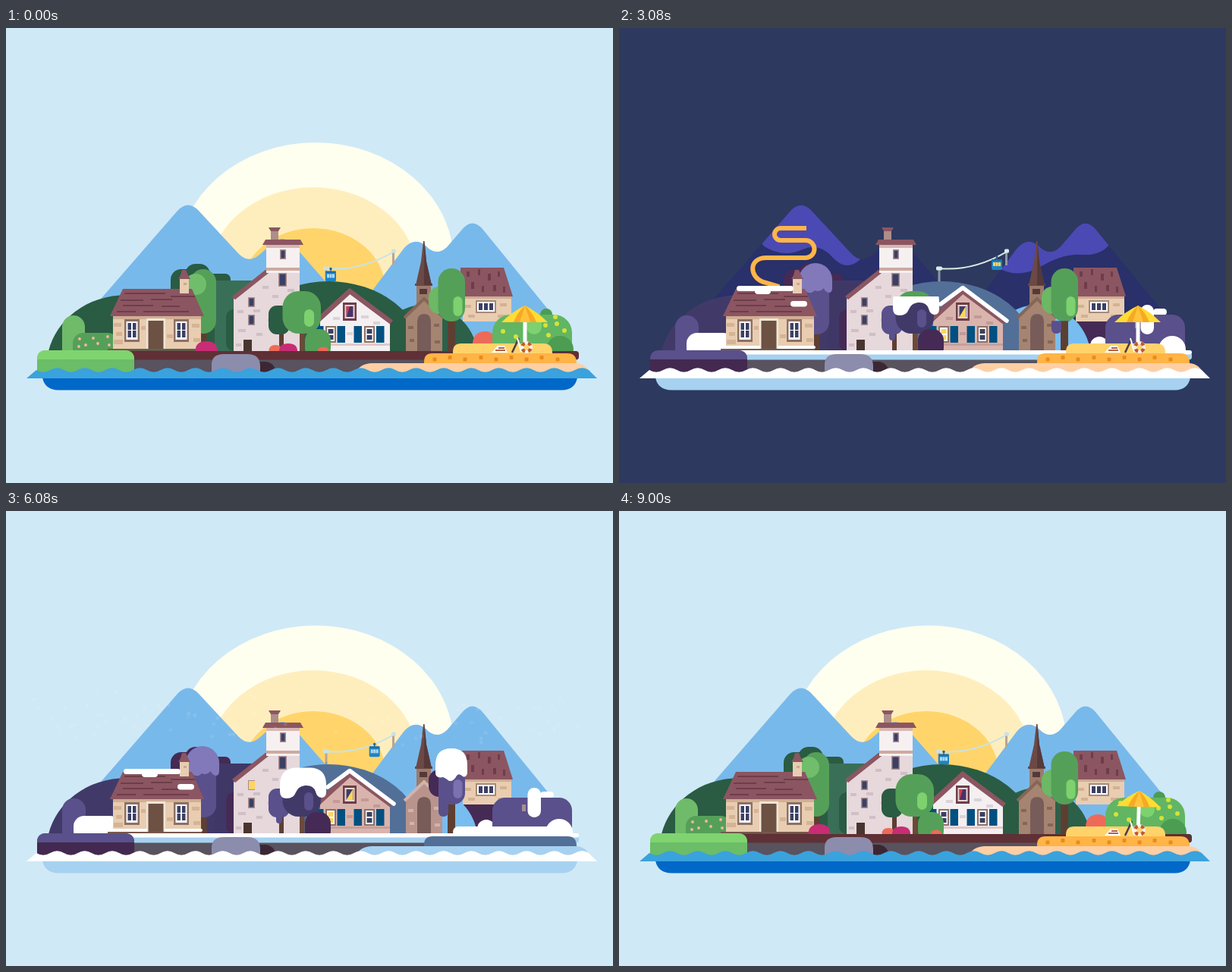
An HTML page that plays this animation: 800 by 600 pixels, repeating every 9960 ms.

```html
<!DOCTYPE html>
<html lang="en">
<head>
<meta charset="utf-8">
<title>Summer and winter village</title>
<style>
html, body { margin: 0; width: 100%; height: 100%; overflow: hidden; background: #d0e9f6; }
svg { display: block; width: 100vw; height: 100vh; }
</style>
</head>
<body>
<svg id="stage" viewBox="0 0 800 600"></svg>
<script>
const LOOP = 9960, REST = 9000;

// Shape helpers
const R = (x, y, w, h, fill, r = 0) => `<rect x="${x}" y="${y}" width="${w}" height="${h}" rx="${r}" fill="${fill}"/>`;
const P = (d, fill) => `<path d="${d}" fill="${fill}"/>`;
const L = (d, color, width, more = '') => `<path d="${d}" fill="none" stroke="${color}" stroke-width="${width}" ${more}/>`;
const E = (x, y, rx, ry, fill) => `<ellipse cx="${x}" cy="${y}" rx="${rx}" ry="${ry}" fill="${fill}"/>`;
const C = (x, y, r, fill) => E(x, y, r, r, fill);
const G = (id, body) => `<g id="${id}">${body}</g>`;
const dots = (list, r, fill) => list.map(([x, y]) => C(x, y, r, fill)).join('');
const bars = (list, fill) => list.map(([x, y, w, h = 2]) => R(x, y, w, h, fill)).join('');

// Timing: [winter starts, winter full, summer starts, summer full]
const clamp = v => Math.max(0, Math.min(1, v));
const ease = v => (v = clamp(v), v < .5 ? 2 * v * v : 1 - 2 * (1 - v) ** 2);
const wave = v => (1 - Math.cos(Math.PI * clamp(v))) / 2;
const winter = (t, [a, b, c, d]) => ease((t - a) / (b - a)) - ease((t - c) / (d - c));

// A season change that climbs from y1 up to y0
const swaps = [];
function swap(span, y0, y1, summer, snowy) {
  const n = swaps.push({ span, y0, y1 }) - 1;
  return `<clipPath id="s${n}"><rect width="800" height="600"/></clipPath>
    <clipPath id="w${n}"><rect width="800" height="600"/></clipPath>
    <g clip-path="url(#s${n})">${summer}</g><g clip-path="url(#w${n})">${snowy}</g>`;
}

// A piece that shrinks to its foot in winter
const pops = [];
function pop(span, x, y, body, tilt = 0) {
  const n = pops.push({ span, x, y, tilt }) - 1;
  return G('p' + n, body);
}

const ROOF = '#8b5661', ROOF_DK = '#6e3d49', WALL = '#e8cdb1', PANE = '#3b4064', FOREST = '#2a5b43',
  LEAF = '#55a058', LIME = '#7dd16f', PLUM = '#452a55', VIOLET = '#5a508b', DUSK = '#413a69',
  ICE = '#a6d1f0', STEEL = '#526f98', SNOW = '#fff', GOLD = '#ffd55e', TRUNK = '#5d3f32',
  CORAL = '#ee6a58', PINK = '#c82c74';

const sky = () => R(0, 0, 800, 600, '#d0e9f6') + G('night', C(400, 300, 1, '#2d395f'));

// Everything behind the shore ends at the waterline
function backdrop() {
  return `<clipPath id="land"><rect width="800" height="440"/></clipPath><g clip-path="url(#land)">${sun() + mountains() + hills()}</g>`;
}

function sun() {
  return G('sun0', E(0, 0, 182, 157, '#fffff0')) + G('sun1', E(0, 0, 137, 115, '#ffeebd')) + G('sun2', E(0, 0, 95, 81, '#ffd56b'));
}

function mountains() {
  const d = `M66 425L226 241Q240 226 254 241L306 297Q320 312 335 298L350 285Q364 271 378 285L500 425Z
    M424 425L524 291Q538 275 553 287Q567 302 581 289L600 267Q614 249 628 265L716 373V425Z`;
  const caps = `M150 200H330L318 305Q300 322 282 303Q264 282 242 292Q215 304 190 287Z
    M490 200H660L645 287Q634 300 612 299Q585 296 552 317Q522 331 498 315Z`;
  return `<clipPath id="ridge"><path d="${d}"/></clipPath>` + G('slopes', P(d, '#78b9eb'))
    + `<g clip-path="url(#ridge)"><g id="peaks">${P(d, '#29306a')}<g clip-path="url(#ridge)">${G('caps', P(caps, '#4b49b3'))}</g></g></g>`;
}

function hills() {
  const left = 'M56 426C66 386 105 352 160 352H300V426Z';
  const wood = (a, b) => R(217, 318, 55, 60, a, 14) + R(236, 311, 33, 40, a, 14) + R(262, 324, 34, 36, a, 7)
    + R(275, 333, 75, 93, b) + R(290, 371, 40, 55, a, 10);
  const pole = c => R(420.5, 316, 3, 19, c) + R(509, 294, 3, 19, c);
  const rope = c => L('M422 317Q466.5 321 511 295', c, 2) + R(418, 314.5, 8, 5, c, 1.5) + R(508, 291.5, 6, 5, c, 1.5);
  return swap([2000, 2700, 6200, 6900], 350, 426, P(left, FOREST), P(left, DUSK))
    + swap([2050, 2750, 6250, 6950], 309, 426, wood(FOREST, '#3a6f57'), wood(PLUM, '#3f3866'))
    + swap([2300, 2800, 5700, 6200], 290, 336, pole('#b7a596') + rope('#c9e3e6'), pole('#8d97a9') + rope('#dcebe4'))
    + G('car', L('M0 0V4', '#2b5f8f', 1.5) + C(0, 0, 1.7, '#2b5f8f') + R(-7, 4, 14, 13, '#1f83c4', 2) + R(-7, 3, 14, 2.5, '#1c6dad', 1)
      + G('panes', [-5, -1.5, 2].map(x => R(x, 7, 3, 5, 'inherit')).join('')))
    + swap([2200, 2900, 6200, 6900], 363, 426, E(552, 436, 70, 71, '#2c6049'),
      R(600, 383, 90, 44, PLUM, 12) + E(552, 436, 70, 71, '#78bdf0'))
    + swap([1950, 2650, 6100, 6750], 332, 426, E(425, 434, 125, 100, FOREST), E(425, 434, 125, 100, STEEL));
}

function window2(x) {
  return R(x, 384, 20, 30, '#8d7065') + R(x + 2.5, 387, 15, 24, '#fff')
    + [[4.5, 389], [11, 389], [4.5, 399], [11, 399]].map(([a, y]) => R(x + a, y, 4.5, 9, PANE)).join('');
}

function cottage() {
  const tree = R(257, 385, 7.5, 41, TRUNK);
  const summerTree = R(243, 318, 34, 85, LEAF, 17) + C(250, 338, 14, '#70bd6c');
  const snowyTree = R(243, 325, 34, 79, VIOLET, 16)
    + P('M237 332A22 22 0 0 1 281 332V343Q281 349 276 349Q271 347 270 343Q264 349 258 346Q252 352 246 347Q237 347 237 340Z', '#8279ba');
  const flowers = dots([[97, 410], [105, 418], [115, 409], [121, 416], [134, 407], [136, 418], [96, 420]], 1.9, '#f6b6a6');
  const roof = bars([[156, 349, 54], [217, 353, 32], [151, 358, 30], [191, 357, 28], [154, 365, 40], [205, 366, 24], [146, 373, 25], [181, 373, 60]], ROOF_DK);
  return tree + swap([2100, 2700, 6250, 6950], 309, 426, summerTree, snowyTree)
    + swap([2100, 2700, 6900, 7500], 377, 426, R(74, 379, 30, 60, '#6fbb69', 15), R(74, 379, 31, 60, VIOLET, 15))
    + swap([2200, 2800, 7250, 7750], 401, 426, R(88, 402, 60, 34, LEAF, 14) + flowers, R(89, 402, 62, 34, SNOW, 14))
    + L('M247 264H213A8 8 0 0 0 213 280H246A11.5 11.5 0 0 1 246 303H194C171 303 171 328 190 335L214 342', '#ffb549', 6, 'id="smoke"')
    + R(141, 378, 116, 47, WALL) + R(141, 379, 116, 5, '#d1ae94')
    + bars([[142, 389, 10, 5], [145, 401, 8, 5], [142, 411, 12, 6], [178, 393, 6, 5], [212, 404, 8, 5], [245, 390, 10, 5], [247, 409, 9, 5]], '#d4b493')
    + P('M154 344H245L261 380H137Z', ROOF) + roof
    + R(229, 330, 12, 20, WALL) + P('M227 331L230 326L232 319H237L240 326L243 331Z', ROOF) + R(234, 336, 4, 3, '#c9a98f')
    + window2(156) + window2(221) + R(185, 383, 25, 42, '#f0e6d8') + R(187.5, 386, 20, 39, '#6d5143')
    + R(134, 423, 124, 2.5, '#77594c')
    + swap([2250, 2850, 7350, 7800], 338, 367, '', R(155, 340, 75, 7, SNOW, 3.5) + R(179, 343, 21, 8, SNOW, 4))
    + swap([2300, 2850, 6800, 7200], 358, 424, '', R(226, 360, 22, 7.5, SNOW, 3.7) + R(209, 419, 50, 4, SNOW, 2) + R(141, 419, 45, 4, SNOW));
}

function tower() {
  const pane = (x, y, w, h) => R(x, y, w, h, '#a98c90') + R(x + 1.5, y + 1.5, w - 3, h - 3, PANE);
  return P('M300 426V357L343 322H387V426Z', '#e6d8db')
    + bars([[338, 340, 8, 4], [351, 352, 8, 4], [371, 344, 9, 4], [305, 372, 8, 4], [326, 371, 9, 4], [345, 383, 8, 4], [306, 397, 10, 4], [330, 402, 8, 4], [303, 416, 7, 4]], '#d0bfc6')
    + L('M300 356L344 321', ROOF, 6) + R(343, 286, 44, 37, '#f6f0f1') + R(343, 286, 44, 4, '#d7b6b1') + R(343, 316, 44, 4, '#cfa99f')
    + R(349, 266, 10, 15, '#ad8e8a') + P('M346 263H362L359 268H349Z', ROOF) + P('M342 279H388L392 286H338Z', ROOF)
    + pane(361, 292, 8, 13) + pane(359, 323, 11, 18) + pane(319, 355, 9, 13) + pane(319, 378, 9, 14) + R(313, 411, 11, 15, '#49352f')
    + swap([3300, 3700, 7000, 7480], 355, 368, '', R(320, 356, 8, 11, GOLD));
}

function chalet() {
  const wall = 'M414 426V383L453 350L506 388V426Z';
  const pane = (x, lit) => R(x, 393, 14, 22, '#8d7065') + R(x + 2, 395, 10, 18, '#fff') + R(x + 3.5, 397, 7, 6, lit) + R(x + 3.5, 405, 7, 6, lit);
  const face = c => bars([[431, 381, 9, 4], [468, 379, 10, 4], [484, 387, 9, 4], [449, 401, 8, 4]], c);
  const loft = R(444, 362, 18, 24, ROOF_DK) + R(446.5, 365, 13, 18, '#e8d6d2');
  const span = [2200, 2900, 6200, 6900];
  return swap(span, 340, 426,
    P(wall, '#f4eff1') + face('#ddd2d8') + R(414, 416, 92, 3, '#dfc9c8') + loft + R(448.5, 367, 9, 14, '#47336a') + P('M448.5 367H453L449 381Z', '#cc3d4d') + pane(421, PANE),
    P(wall, '#d9b4ad') + face('#c29a98') + R(414, 416, 92, 3, '#c69f9b') + loft + R(448.5, 367, 9, 14, PANE) + P('M448.5 381L457 367V381Z', GOLD) + pane(421, GOLD))
    + pane(472, PANE) + [408, 436.5, 458.5, 488].map(x => R(x, 393, 10.5, 22, '#005081')).join('')
    + L('M407 389L453 347L508 388', ROOF, 6.5)
    + swap(span, 338, 390, '', L('M424 364L453 342.5L511 386', SNOW, 5.5, 'stroke-linecap="round" stroke-linejoin="round"'));
}

function midTree() {
  const snowcap = 'M361 361Q361 338.5 384 338.5H400Q422 338.5 422 361V370Q422 378 416 378Q410 378 408 370Q405 361 394 362Q385 363 382 371Q379 379 370 379Q361 379 361 370Z';
  const span = [2600, 3280, 6300, 7000];
  return R(360, 395, 6, 31, TRUNK) + R(387, 398, 6.5, 28, '#6b4a39')
    + swap(span, 339, 426,
      R(346, 366, 28, 38, FOREST, 11) + R(364.5, 347, 50.5, 56, LEAF, 21) + R(393, 371, 13, 23, LIME, 6.5),
      R(346, 366, 28, 38, VIOLET, 11) + R(356, 400, 8, 12, VIOLET, 4) + R(364.5, 347, 50.5, 56, DUSK, 21) + P(snowcap, SNOW) + R(393, 371, 12, 24, VIOLET, 6))
    + swap([2300, 2900, 6300, 6900], 396, 426, R(394, 397, 34, 40, LEAF, 15), R(394, 397, 34, 40, PLUM, 15));
}

function church() {
  const nave = (c, edge) => P('M527 426V380L551 356L575 380V426Z', c) + L('M525 382L551 357L577 382', edge, 4)
    + bars([[530, 393, 7, 4], [564, 390, 7, 4], [532, 410, 6, 4], [565, 412, 7, 4]], edge);
  return R(541, 338, 19, 30, '#9c7a69') + R(545, 344, 10, 7, '#55383a') + R(539, 337, 23, 3, '#6b4843')
    + P('M550 281H551.5L554 308L561 339H540L547 308Z', '#6d4945') + P('M551.5 281L554 308L561 339H551Z', '#55393b')
    + swap([3200, 3700, 6200, 6900], 354, 426, nave('#a58471', '#866657'), nave('#b9948d', '#d3b2aa'))
    + P('M542 426V388Q542 377 551 377Q560 377 560 388V426Z', '#785c59');
}

function rightSide() {
  const snowcap = 'M566 335Q566 313 587 313Q608 313 608 335V346Q606 352 602 350Q597 345 594 349Q590 357 584 356Q579 352 576 351Q566 353 566 345Z';
  const house = R(602, 352, 64, 35, WALL) + R(602, 353, 64, 4, '#cfac95')
    + bars([[605, 365, 8, 4], [651, 363, 9, 4], [609, 378, 9, 4], [648, 378, 11, 4]], '#d3b292')
    + P('M599 316H656L668 354H599Z', ROOF)
    + bars([[607, 321, 4, 7], [622, 318, 3, 8], [635, 324, 4, 9], [648, 321, 3, 7], [613, 335, 4, 9], [627, 340, 3, 8], [642, 339, 4, 8], [655, 341, 3, 8]], ROOF_DK)
    + R(619, 359, 27, 17, '#a68a78') + R(621, 361, 23, 13, '#fff') + bars([[623, 363, 5, 9], [630, 363, 5, 9], [637, 363, 5, 9]], PANE);
  const garden = C(712, 378, 8, '#4c9c52') + R(641, 378, 105, 60, '#62b562', 24) + R(686, 378, 20, 26, LIME, 10) + C(730, 424, 18, '#4c9c52')
    + dots([[655, 400], [672, 407], [711, 392], [726, 390], [736, 399], [715, 405], [661, 385], [724, 381]], 3, '#d4e337');
  const drifts = C(633, 419, 12, SNOW) + R(704, 370, 18, 9, SNOW, 4.5) + R(641, 378, 105, 60, VIOLET, 17) + R(680, 387, 5, 9, '#a58e94')
    + R(687.5, 365, 17.5, 39, SNOW, 8.5) + C(729, 424, 18, SNOW);
  return house + R(582, 380, 10, 46, TRUNK)
    + swap([2800, 3470, 6300, 7000], 313, 426,
      R(557, 341, 28, 36, '#6cb865', 14) + R(569.5, 317, 35.5, 70, LEAF, 17.5) + R(589.5, 354, 12, 26, LIME, 6),
      R(557, 341, 28, 36, PLUM, 14) + R(570, 330, 35, 57, VIOLET, 15) + R(570, 365, 13, 38, VIOLET, 6) + P(snowcap, SNOW) + R(589.5, 354, 12, 25, '#7b71b1', 6))
    + pop([1800, 2300, 7900, 8500], 630, 418, P('M615 418Q615 400 632 400Q645 400 645 418Z', CORAL))
    + swap([2300, 2950, 7300, 7900], 363, 426, garden, drifts);
}

function blooms() {
  const dome = (x, r, h, c) => P(`M${x - r} 426Q${x - r} ${426 - h} ${x} ${426 - h}Q${x + r} ${426 - h} ${x + r} 426Z`, c);
  return pop([900, 1620, 6700, 7150], 264, 426, dome(264, 14.5, 13, PINK))
    + pop([1500, 2000, 8240, 8700], 355, 426, dome(355, 8.5, 8, CORAL))
    + pop([1550, 2050, 8280, 8760], 372, 426, dome(372, 12, 10, PINK))
    + pop([1600, 2100, 8320, 8800], 418, 426, dome(418, 7, 5.5, CORAL));
}

function shore() {
  const lawn = (top, low) => P('M41 456V437Q41 425 53 425H156Q169 425 169 437V456Z', low) + P('M41 437Q41 425 53 425H156Q169 425 169 437Z', top);
  const beach = (low, mid) => P('M460 456Q466 442 483 442H752Q765 443 770 456Z', low) + P('M551 442V440Q551 429 562 429H740Q752 429 752 442Z', mid);
  const grains = [565, 585, 605, 626, 646, 666, 686, 706, 727].map((x, i) => R(x - 2.5, i % 2 ? 432 : 434.5, 5, 5, '#ea8b1d', 1)).join('');
  return R(150, 436, 430, 20, '#59525f')
    + swap([2000, 2700, 7100, 7460], 425, 437, R(140, 426, 615, 11.5, '#5f3035', 4),
      R(140, 428, 615, 9.5, ICE, 4) + R(140, 425, 615, 5.5, SNOW, 2.7))
    + P('M330 456V440H343Q355 442 356 456Z', '#3b2733') + P('M271 456V444Q271 430 287 430H318Q335 430 335 446V456Z', '#8c8cad')
    + swap([2200, 2800, 6985, 7385], 425, 452, lawn('#80d46f', '#6bbd67'), lawn(VIOLET, '#432950'))
    + swap([3300, 4000, 7400, 8200], 416, 454,
      P('M589 430V427Q589 416 600 416H708Q720 416 720 428V430Z', '#ffd36a') + beach('#ffcfa4', '#ffb446') + grains,
      R(589, 416, 158, 14, SNOW, 7) + beach(ICE, STEEL));
}

function leisure() {
  const ring = C(686, 421, 8, '#f7f0e6') + [0, 90, 180, 270].map(a => `<path transform="rotate(${a + 20} 686 421)" d="M686 413A8 8 0 0 1 691.6 415.4L688.5 418.5H686Z" fill="#c2582c"/>`).join('') + C(686, 421, 3.4, '#ffd36a');
  const chairs = L('M667 428L676 409', '#4b3b44', 2.5) + L('M674 409L679 427', '#fff', 2) + P('M640 428L648 419H657L661 428Z', '#fff') + bars([[645, 424, 13], [649, 421, 8]], '#b5624a');
  const canopy = P('M653 388Q667 374 684 366Q700 374 714 388Z', '#ffdc34') + P('M669 388Q674 375 684 366Q694 375 699 388Z', '#f9a824') + P('M677 388L684 366L691 388Z', '#ffc43b');
  return pop([3200, 3700, 8300, 9131], 684, 428, R(681.5, 386, 5, 40, '#fff') + canopy, 35)
    + pop([3250, 3750, 8250, 8850], 670, 428, chairs + ring);
}

function water() {
  let d = 'M27 462L40 451q9.1 5.5 18.2 0';
  for (let i = 1; i < 40; i++) d += 't18.2 0';
  d += 'L779 462Z';
  const deep = 'M48 461H753Q750 477 733 477.5H69Q51 477 48 461Z';
  return G('lake', P(deep, '#0068c8') + P(d, '#3aa2dd'))
    + '<clipPath id="ice"><rect y="440" height="50"/></clipPath>'
    + `<g clip-path="url(#ice)">${P(deep, ICE) + P(d, SNOW)}</g>`;
}

// Snowfall from a seeded generator
let seed = 11;
const rnd = () => (seed = (seed * 16807) % 2147483647) / 2147483647;
const flakes = Array.from({ length: 125 }, () => {
  let x = 30 + rnd() * 725;
  if (x > 370 && x < 500 && rnd() < .6) x = 30 + rnd() * 320;
  return { x, y: 236 + rnd() * 50 - (rnd() < .06 ? 30 : 0), drift: rnd() * 16 - 8, phase: rnd(), life: 900 + rnd() * 700 };
});

const stage = document.getElementById('stage');
stage.innerHTML = `<defs><radialGradient id="soft"><stop offset=".35" stop-color="#fff"/><stop offset="1" stop-color="#fff" stop-opacity="0"/></radialGradient></defs>`
  + sky() + backdrop() + cottage() + tower() + chalet() + midTree() + church() + rightSide() + blooms() + shore() + leisure() + water()
  + G('snow', flakes.map(() => C(0, 0, 3.4, 'url(#soft)')).join(''));

const $ = id => document.getElementById(id);
const set = (el, attrs) => { for (const k in attrs) el.setAttribute(k, attrs[k]); };
const show = (el, on) => set(el, { visibility: on ? 'visible' : 'hidden' });
swaps.forEach((s, i) => { s.top = $('s' + i).firstChild; s.low = $('w' + i).firstChild; });
pops.forEach((p, i) => p.el = $('p' + i));
const night = $('night').firstChild, ice = $('ice').firstChild, smoke = $('smoke'), snow = $('snow');
const suns = [[408, 308], [405, 325], [405, 345]].map(([x, y], i) => ({ el: $('sun' + i), x, y }));
const smokeLength = smoke.getTotalLength();

function draw(t) {
  const r = 520 * winter(t, [930, 1410, 5009, 5487]);
  set(night, { rx: r, ry: r });

  const down = winter(t, [1085, 1775, 5000, 5690]);
  for (const s of suns) {
    set(s.el, { transform: `translate(${s.x} ${s.y + 166 * down}) scale(${1 - .3 * down})` });
    show(s.el, down < .99);
  }

  const sink = 190 * (1 - winter(t, [1900, 2700, 5050, 5810]));
  set($('peaks'), { transform: `translate(0 ${sink})` });
  set($('caps'), { transform: `translate(0 ${-1.6 * sink})` });
  show($('slopes'), sink > 0);
  show($('peaks'), sink < 190);

  for (const s of swaps) {
    const cut = s.y1 - winter(t, s.span) * (s.y1 - s.y0);
    const full = cut <= s.y0, none = cut >= s.y1;
    set(s.top, { height: full ? 0 : none ? 600 : cut });
    set(s.low, { y: full ? 0 : cut, height: none ? 0 : 600 });
  }

  for (const p of pops) {
    const w = winter(t, p.span);
    set(p.el, { transform: `translate(${p.x} ${p.y}) rotate(${p.tilt * w}) scale(${1 - w}) translate(${-p.x} ${-p.y})` });
  }

  const half = 378 * winter(t, [700, 1400, 7500, 8200]);
  set(ice, { x: 405 - half, width: 2 * half });
  show($('lake'), half < 378);

  const drawn = ease((t - 2300) / 850), gone = ease((t - 5200) / 570);
  set(smoke, {
    'stroke-dasharray': `${smokeLength * Math.max(0, drawn - gone)} 999`,
    'stroke-dashoffset': -smokeLength * gone
  });
  show(smoke, drawn > gone);

  const x = 428 + 80 * (wave(t / 4000) - wave((t - 4480) / 4520)), u = (x - 422) / 89;
  const y = 317 * (1 - u) ** 2 + 642 * u * (1 - u) + 295 * u * u;
  set($('car'), { transform: `translate(${x} ${y})` });
  for (const pane of $('panes').children) set(pane, { fill: t > 2500 && t < 6000 ? GOLD : '#a9dcf5' });

  const fall = clamp((t - 3500) / 500) * clamp((6150 - t) / 600);
  set(snow, { opacity: fall });
  if (fall) flakes.forEach((f, i) => {
    const k = (t / f.life + f.phase) % 1;
    set(snow.children[i], { cx: f.x + f.drift * k, cy: f.y + 30 * k, opacity: Math.min(1, 1.5 * Math.sin(Math.PI * k)) });
  });
}

const start = performance.now();
function tick() {
  draw(Math.min(REST, (performance.now() - start) % LOOP));
  requestAnimationFrame(tick);
}
tick();
</script>
</body>
</html>
```
